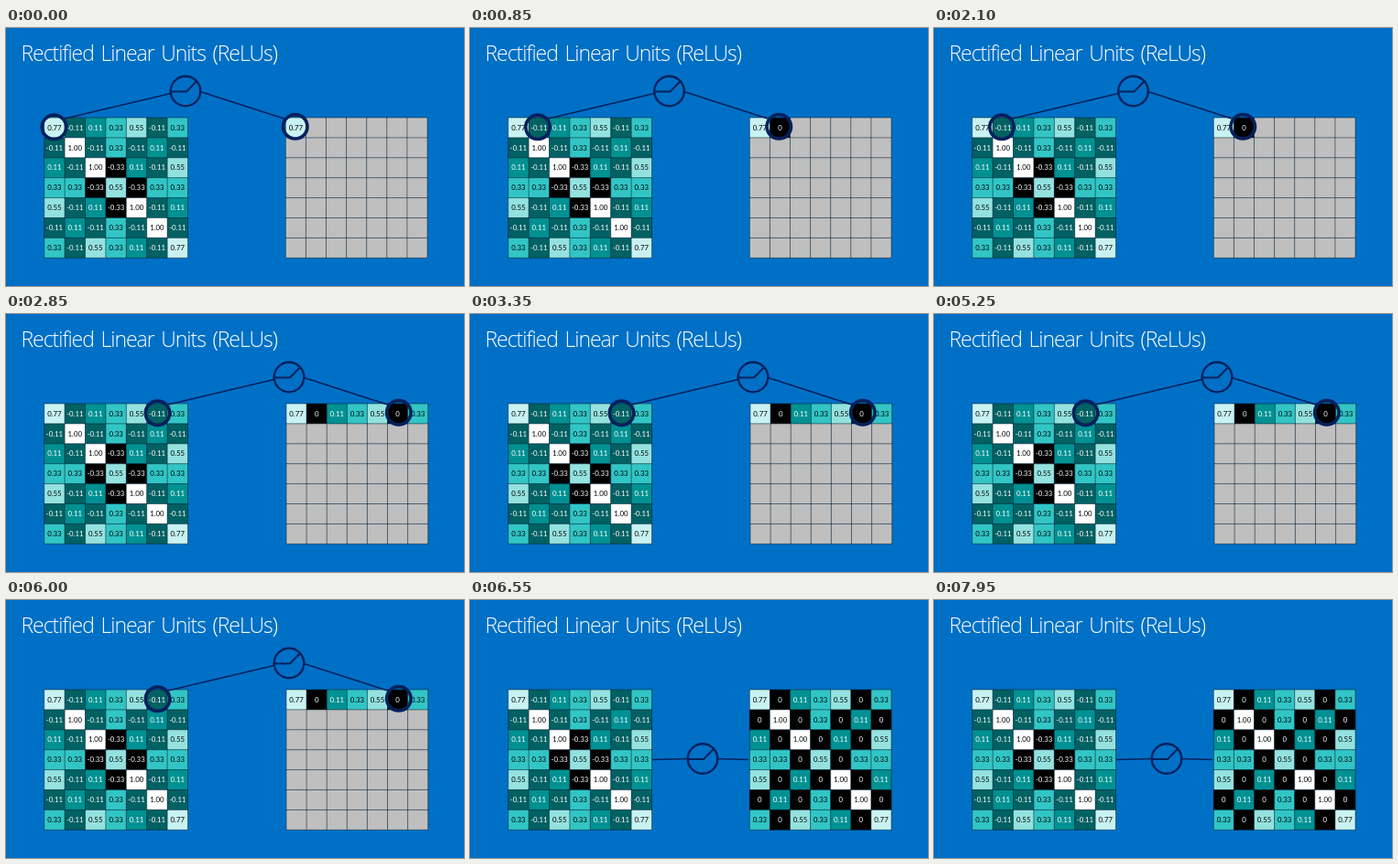
Write an HTML page with a canvas that moves like this. It is 500x282 px and loops after 8 s.

```html
<!DOCTYPE html>
<html>
<head>
<meta charset="utf-8">
<style>
html, body { margin: 0; width: 100%; height: 100%; overflow: hidden; background: #0070c6; }
canvas { display: block; width: 500px; height: 282px; }
</style>
</head>
<body>
<canvas id="stage"></canvas>
<script>
const LOOP = 8000;
const BLUE = '#0070c6';
const NAVY = '#06205c';
const SIZE = 7;
const TOP = 98;
const ROW = 21.9;

// Cell values in hundredths
const VALUES = [
  [77, -11, 11, 33, 55, -11, 33],
  [-11, 100, -11, 33, -11, 11, -11],
  [11, -11, 100, -33, 11, -11, 55],
  [33, 33, -33, 55, -33, 33, 33],
  [55, -11, 11, -33, 100, -11, 11],
  [-11, 11, -11, 33, -11, 100, -11],
  [33, -11, 55, 33, 11, -11, 77]
];
const FILL = {
  '100': '#fff', '77': '#c9f2f2', '55': '#94e2df', '33': '#32c5c5',
  '11': '#009192', '-11': '#006163', '-33': '#000', '0': '#000'
};

// filled: cells shown on the right; shift: offset of the linked rings
const STAGES = [
  { start: 0, filled: 1, shift: 0, rightX: 305.3 },
  { start: 450, filled: 2, shift: 21.5, rightX: 305.3 },
  { start: 2700, filled: 7, shift: 113, rightX: 306 },
  { start: 6350, filled: 49, rightX: 305.3 }
];

const canvas = document.getElementById('stage');
const ctx = canvas.getContext('2d');
const ratio = window.devicePixelRatio || 1;
canvas.width = 500 * ratio;
canvas.height = 282 * ratio;
ctx.scale(ratio, ratio);

function stroke(points, width) {
  ctx.beginPath();
  points.forEach(([x, y]) => ctx.lineTo(x, y));
  ctx.lineWidth = width;
  ctx.strokeStyle = NAVY;
  ctx.stroke();
}

function ring(x, y, radius, width) {
  ctx.beginPath();
  ctx.arc(x, y, radius, 0, Math.PI * 2);
  ctx.lineWidth = width;
  ctx.strokeStyle = NAVY;
  ctx.stroke();
}

function lens(x, y) {
  ring(x, y, 16.3, 2.4);
  stroke([[x - 16, y + 0.5], [x + 1, y + 0.5], [x + 11.8, y - 10.5]], 2);
}

function grid(left, col, filled, rectify) {
  ctx.font = '7.8px Carlito, Lato, sans-serif';
  ctx.textAlign = 'center';
  for (let i = 0; i < SIZE * SIZE; i++) {
    const c = i % SIZE, r = Math.floor(i / SIZE);
    const x = left + c * col, y = TOP + r * ROW;
    const value = rectify ? Math.max(0, VALUES[r][c]) : VALUES[r][c];
    ctx.fillStyle = i < filled ? FILL[value] : '#bfbfbf';
    ctx.fillRect(x, y, col, ROW);
    if (i < filled) {
      ctx.fillStyle = value > 11 ? '#000' : '#fff';
      ctx.fillText(value ? (value / 100).toFixed(2) : '0', x + col / 2, y + ROW / 2 + 2.7);
    }
  }
  ctx.beginPath();
  for (let i = 0; i <= SIZE; i++) {
    ctx.moveTo(left + i * col, TOP);
    ctx.lineTo(left + i * col, TOP + SIZE * ROW);
    ctx.moveTo(left, TOP + i * ROW);
    ctx.lineTo(left + SIZE * col, TOP + i * ROW);
  }
  ctx.strokeStyle = 'rgba(0, 15, 25, 0.6)';
  ctx.lineWidth = 0.8;
  ctx.stroke();
}

function title() {
  ctx.font = '300 23px "Open Sans", sans-serif';
  ctx.letterSpacing = '-1px';
  ctx.wordSpacing = '2.5px';
  ctx.textAlign = 'left';
  ctx.fillStyle = '#fff';
  ctx.fillText('Rectified Linear Units (ReLUs)', 16.4, 36);
  ctx.letterSpacing = ctx.wordSpacing = '0px';
}

function draw(time) {
  const stage = STAGES.filter(s => s.start <= time).pop();
  ctx.fillStyle = BLUE;
  ctx.fillRect(0, 0, 500, 282);
  title();
  grid(41.7, 22.4, 49, false);
  grid(stage.rightX, 22.1, stage.filled, true);

  if (stage.shift === undefined) {
    stroke([[199, 174.6], [238, 173.5]], 1.5);
    stroke([[270, 173.5], [304, 174.6]], 1.5);
    lens(254, 173.5);
  } else {
    const s = stage.shift;
    stroke([[64 + s, 99], [180 + s, 71.5]], 1.5);
    stroke([[212 + s, 69.5], [305 + s, 99.5]], 1.5);
    lens(196 + s, 69);
    ring(52.5 + s, 108.3, 13.2, 3.6);
    ring(315.8 + s, 107.8, 13.2, 3.6);
  }
}

function tick(now) {
  draw(now % LOOP);
  requestAnimationFrame(tick);
}
requestAnimationFrame(tick);
</script>
</body>
</html>
```
